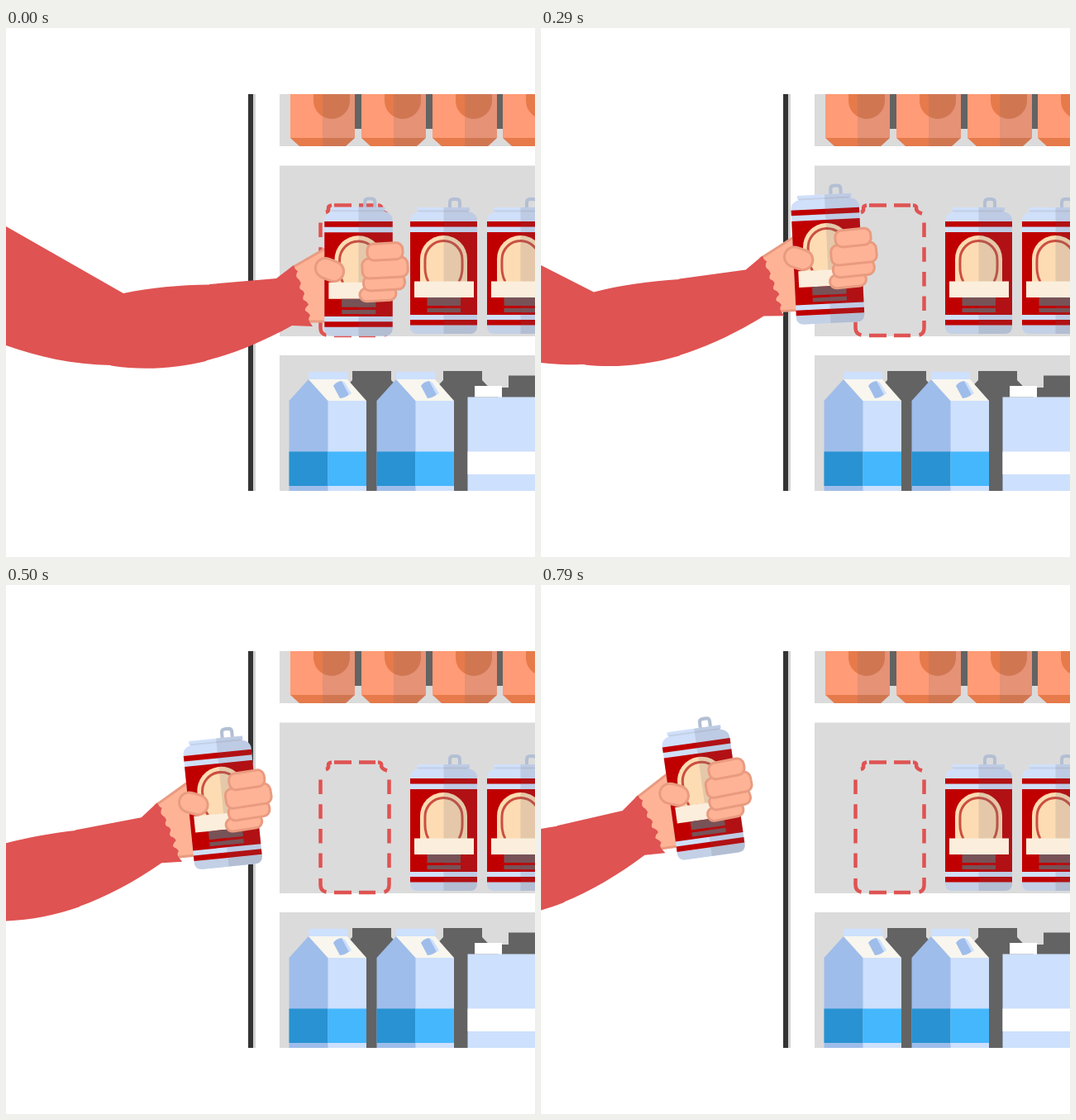
Recreate the animation shown at these times as an HTML page. Size 640 px wide and 640 px high, loop 4.78 s.

```html
<!DOCTYPE html>
<html lang="en">
<head>
<meta charset="utf-8">
<title>Taking a can from the fridge</title>
<style>
  html, body { margin: 0; height: 100%; overflow: hidden; background: #fff; }
  svg { display: block; width: 100%; height: 100%; }
</style>
</head>
<body>
<svg viewBox="0 0 640 640">
  <defs>
    <g id="soda">
      <path fill="#ff9b76" d="M344 70h78v63h-78z"/>
      <path fill="#e67a4b" d="M344 133h78l-11 10h-56zM372 88a22 22 0 0 0 44 0v-12h-44z"/>
      <path fill="#676778" fill-opacity=".17" d="M383 70h39v63l-11 10h-28z"/>
    </g>

    <g id="can">
      <path fill="none" stroke="#b3bfd3" stroke-width="4" d="M537 218v-7q0-4 4-4h4q4 0 4 4v7"/>
      <path fill="#d0e0fa" d="M497 217h64v4h-3l7 3q5 3 5 9v128q0 9-9 9h-63q-9 0-9-9V233q0-6 5-9l7-3h-4z"/>
      <path fill="#c3d0e6" d="M497 220.500h64l-2 2h-60zM489 359h81v2q0 9-9 9h-63q-9 0-9-9zM489 240h81v1h-81z"/>
      <path fill="#c00000" d="M489 234h81v6.500h-81zM489 247h81v100h-81zM489 353h81v6.500h-81z"/>
      <path fill="#fddcb3" d="M501 307v-27.500a28.500 28.500 0 0 1 57 0V307z"/>
      <path fill="none" stroke="#cb4f40" stroke-width="3" d="M511 307C506 298 507 289 507 280a22.500 22.500 0 0 1 45 0C552 289 553 298 548 307"/>
      <path fill="#676778" fill-opacity=".17" d="M529.500 217H561v4h-3l7 3q5 3 5 9v128q0 9-9 9h-31.500z"/>
      <path fill="#fbeedc" d="M494 306.500h72V326h-72z"/>
      <path fill="#775357" d="M509.500 326H550v10h-40.500zM509.500 339H550v5h-40.500z"/>
    </g>

    <g id="carton">
      <path fill="#cde0fd" d="M366 416h47v9h-47zM389 451h47v120h-47z"/>
      <path fill="#9fbdea" d="M342.500 451l23.500-26 23.500 26v120h-47z"/>
      <path fill="#f8f6ee" d="M366 425h47l23 26h-46.500z"/>
      <path fill="#2892d2" d="M342.500 512.500h47V554h-47z"/>
      <path fill="#45b7fd" d="M389.500 512.500H436V554h-46.500z"/>
      <path fill="#9fbdea" d="M396 433q3-5 10-6l11 14q-4 6-13 7z"/>
      <path fill="#cde0fd" d="M406 427l4 2 8 13-3 2z"/>
    </g>

    <path id="shade" fill="#636363" d="M419 415h47v11l24 25v120h-95V451l24-25z"/>
    <clipPath id="view"><path d="M0 80h640v480H0z"/></clipPath>
  </defs>

  <g clip-path="url(#view)">
    <path fill="#333" d="M293 80h6v480h-6z"/>
    <path fill="#d2d2d2" d="M299 80h3v480h-3z"/>
    <path fill="#dbdbdb" d="M331 80h309v63H331zM331 166.500h309V373H331zM331 396h309v164H331z"/>

    <path fill="#636363" d="M422 80h8v42h-8zM508 80h8v42h-8zM594 80h7v42h-7z"/>
    <use href="#soda"/>
    <use href="#soda" x="86"/>
    <use href="#soda" x="172"/>
    <use href="#soda" x="257"/>

    <use href="#can"/>
    <use href="#can" x="93"/>

    <use href="#shade"/>
    <use href="#shade" x="110"/>
    <use href="#carton"/>
    <use href="#carton" x="106"/>
    <path fill="#636363" d="M608 420.500h32V435h-32zM600 435h40v12h-40z"/>
    <path fill="#cde0fd" d="M558.500 446.500H640V560h-81.500z"/>
    <path fill="#fff" d="M567 433h33v13.500h-33zM558.500 512.500H640V540h-81.500z"/>

    <!-- empty place on the shelf -->
    <g fill="none" stroke="#df5352" stroke-width="4.500" stroke-linejoin="round">
      <path stroke-dasharray="17.500 12.200" d="M380.500 235.500V344M463.500 235.500V344"/>
      <path d="M380.500 355v8q0 7 7 8.500M463.500 354v9q0 7-6 8.500M397 372h21M427 372h20M397 214.500h21M427 214.500h20M387 223q4-1 3-5 0-3 4-3.500M450 214.500q5 0 4 4 0 4 7 6"/>
    </g>

    <g id="arm">
      <path fill="#ffb396" stroke="#e99b80" stroke-width="3" d="M346 290l40-23 10 30-8 58h-26z"/>
      <use href="#can" transform="translate(426.500 289) scale(1.018) translate(-529.500 -288)"/>
      <g fill="#ffb396" stroke="#e99b80" stroke-width="3">
        <rect x="-17.500" y="-12" width="35" height="24" rx="12" transform="translate(391.500 292.500) rotate(22)"/>
        <g id="fingers"></g>
      </g>
      <path fill="#df5352" d="M-60 206L0 240 142 321C175 314 210 311 246 310.500V310L327 303 348 287q1 5 5 7-3 5-1 8 4 3 5 7-3 4-1 7 5 2 5 6-3 4-1 7 5 2 6 6-5 4-4 7 5 3 6 6-3 3-1 7l4 6-25-1C310 380 275 394 242 402.500V403C205 412 165 414.500 127 408.500V408C80 407 40 398 0 384L-60 360z"/>
    </g>
  </g>
</svg>
<script>
  const LOOP = 4780, FPS = 14;
  // share of the pull completed at each step
  const pull = [0, .025, .105, .21, .349, .44, .572, .717, .84, .896, .97, 1];
  // centre x, centre y, width, height
  const fingers = [[450, 322, 44, 16], [457.500, 308, 50, 18], [458.500, 290, 55, 24], [458.500, 270.500, 43, 20]];
  const arm = document.getElementById("arm");

  document.getElementById("fingers").innerHTML = fingers.map(([x, y, w, h]) =>
    `<rect x="${-w / 2}" y="${-h / 2}" width="${w}" height="${h}" rx="8" transform="translate(${x} ${y}) rotate(-3)"/>`
  ).join("");

  function draw(now) {
    const step = Math.floor((now % LOOP + 5) * FPS / 1000);
    const p = pull[Math.min(step, pull.length - 1)];
    arm.setAttribute("transform", `translate(${-224 * p} ${-4.5 * p}) rotate(${-8 * p} 142 321)`);
  }

  const start = performance.now();
  function tick() {
    draw(performance.now() - start);
    requestAnimationFrame(tick);
  }
  tick();
</script>
</body>
</html>
```
